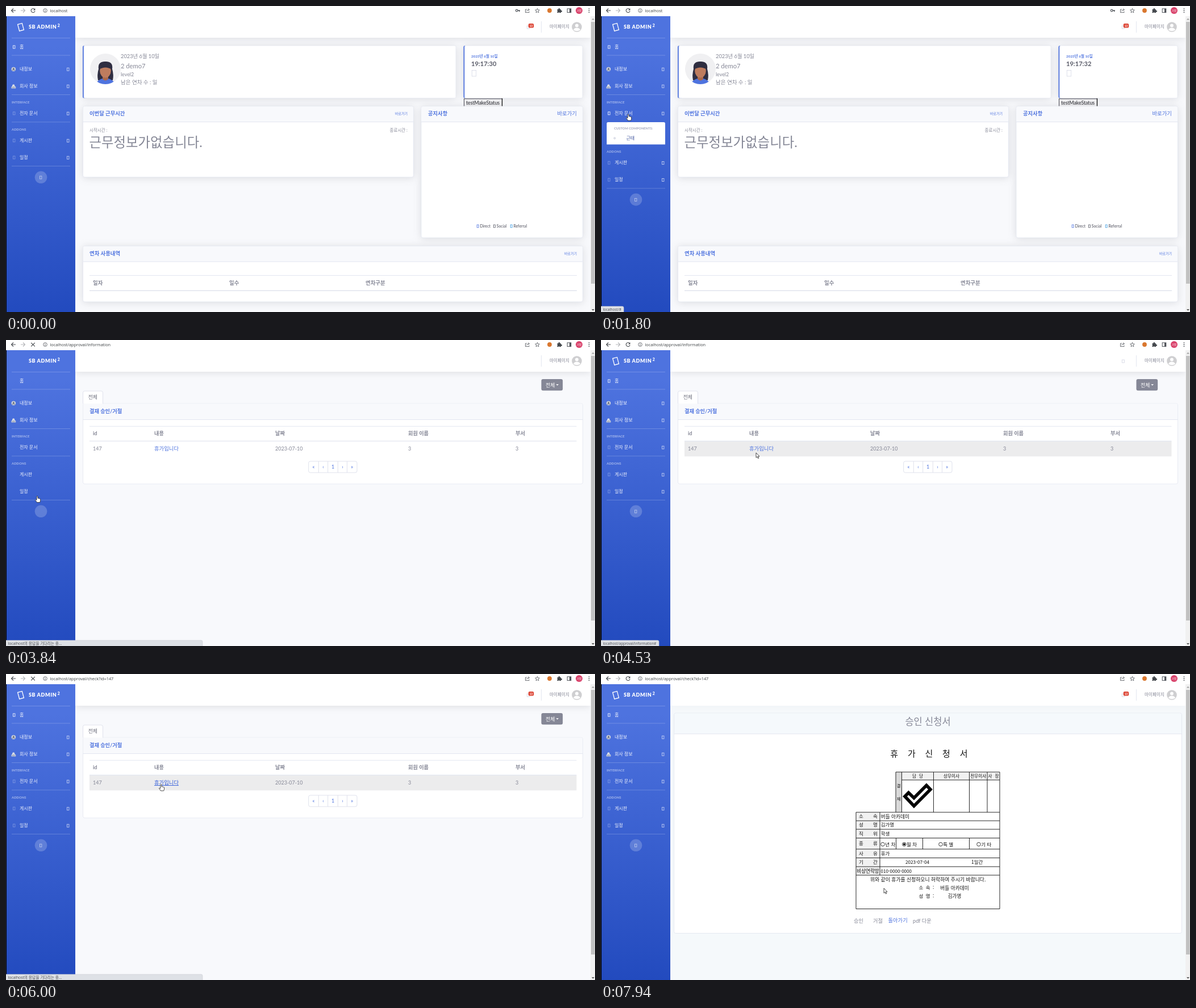
Animation of 1037x540 px, one loop 8 s. Source, as an HTML page:

```html
<!DOCTYPE html>
<html lang="ko">
<head>
<meta charset="utf-8">
<title>Admin dashboard</title>
<style>
html, body { margin: 0; width: 100%; height: 100%; overflow: hidden; background: #fff; }
svg { display: block; width: 100%; height: 100%; }
text { font-family: Lato, "Noto Sans CJK KR", "Noto Sans CJK", sans-serif; }
.ui text { font-family: "Open Sans", "Noto Sans CJK KR", "Noto Sans CJK", sans-serif; }
.form text { font-family: "Noto Sans CJK KR", "Noto Sans CJK", sans-serif; }
</style>
</head>
<body>
<script>
const LOOP = 8000;
const BLUE = '#4e73df', GRAY = '#858796', LINE = '#e3e6f0', PALE = '#f8f9fc';
const BOLD = 'font-weight="700"', HEAVY = 'font-weight="900"';
const MID = 'text-anchor="middle"', END = 'text-anchor="end"';

// Markup helpers; text is placed by its vertical centre.
const text = (x, y, s, size, fill = GRAY, extra = '') =>
  `<text x="${x}" y="${(y + size * .37).toFixed(2)}" font-size="${size}" fill="${fill}" ${extra}>${s}</text>`;
const rect = (x, y, w, h, fill, extra = '') =>
  `<rect x="${x}" y="${y}" width="${w}" height="${h}" fill="${fill}" ${extra}/>`;
const circle = (x, y, r, fill, extra = '') => `<circle cx="${x}" cy="${y}" r="${r}" fill="${fill}" ${extra}/>`;
const path = (d, stroke, width = 1, extra = '') =>
  `<path d="${d}" fill="none" stroke="${stroke}" stroke-width="${width}" ${extra}/>`;
const hline = (x1, x2, y, stroke = LINE, width = 1) => path(`M${x1} ${y}H${x2}`, stroke, width);
const group = (id, body, extra = '') => `<g id="${id}" ${extra}>${body}</g>`;
const tofu = (x, y, w, h, stroke, extra = '') => rect(x - w / 2, y - h / 2, w, h, 'none', `stroke="${stroke}" stroke-width=".8" ${extra}`);

const card = (x, y, w, h, head) =>
  rect(x, y, w, h, '#fff', `rx="3" stroke="${LINE}" stroke-width=".8"`) +
  (head ? rect(x + .4, y + .4, w - .8, head, PALE, 'rx="2.5"') + hline(x, x + w, y + head) : '');
const accentCard = (x, y, w, h) => rect(x, y, 8, h, BLUE, 'rx="2.5"') +
  rect(x + 2, y, w - 2, h, '#fff', `rx="2" stroke="${LINE}" stroke-width=".6"`);

function browser() {
  const ink = '#50545a';
  return rect(0, 0, 1037, 18, '#fff') +
    path('M17 8H9.5M13 4.5L9.5 8L13 11.5', '#45494e', 1.1) +
    path('M26 8H33.5M30 4.5L33.5 8L30 11.5', '#b4b6b9', 1.1) +
    group('reload', path('M50.3 5.7A3.5 3.5 0 1 0 51 8.9', '#45494e', 1.1) + '<path d="M51.4 4V7.4H48z" fill="#45494e"/>') +
    group('stop', path('M44.2 4.8L50.8 11.4M50.8 4.8L44.2 11.4', '#45494e', 1.1)) +
    circle(69, 8, 3.3, 'none', `stroke="${ink}" stroke-width=".8"`) + path('M69 7.5V10M69 6V6.8', ink, .9) +
    text(77.5, 8.2, '', 7.35, '#3c4043', 'id="url"') +
    group('key', circle(899.2, 8, 1.8, 'none', `stroke="${ink}" stroke-width="1.2"`) + path('M901 8H905M903.8 8V10', ink, 1.3)) +
    path('M917 6H914.5V11.5H921V9.5M916.5 9.5Q917 6.5 921 6.5M919.3 4.5L921.5 6.5L919.3 8.5', ink, .8) +
    path('M935.5 4.2L936.6 6.9L939.4 7.1L937.2 8.9L937.9 11.7L935.5 10.2L933.1 11.7L933.8 8.9L931.6 7.1L934.4 6.9Z', ink, .8) +
    circle(957, 8, 3.9, '#d9772f') +
    '<path d="M970.5 6H972.6A1.4 1.4 0 1 1 975.2 6H977V8A1.4 1.4 0 1 1 977 10.4V12H974.8A1.3 1.3 0 0 0 972.4 12H970.5V10A1.4 1.4 0 0 0 970.5 7.7Z" fill="#45494e"/>' +
    rect(988.2, 4.8, 6.6, 6.6, 'none', `stroke="${ink}"`) + rect(992, 5, 3, 6.4, ink) +
    circle(1009, 8, 6, '#d9426b') + text(1009, 8, '가명', 4.4, '#fff', MID) +
    [4.8, 8, 11.2].map(y => circle(1026.5, y, .9, ink)).join('');
}

const topbar = () =>
  rect(122, 18, 907, 38, '#fff', 'filter="url(#shadow)"') +
  tofu(919.3, 37.5, 4, 5, '#d1d3e2', 'class="glyph"') +
  group('badge', rect(919.8, 31, 9.4, 7.6, '#dc4434', 'rx="2"') + text(924.5, 34.8, '13', 4.8, '#fff', `${MID} ${BOLD}`)) +
  path('M942.5 27V47', LINE) +
  text(957, 36.3, '마이페이지', 7.6) +
  circle(1005, 37, 8.8, '#cfcfd1') + circle(1005, 34.5, 2.9, '#fff') +
  '<path d="M999 42.6Q1000 38.6 1005 38.6T1011 42.6Q1005 46 999 42.6Z" fill="#fff"/>';

const navLink = (y, label, id) =>
  (id ? tofu(14.2, y + .4, 3.4, 5, '#fff', `class="glyph" id="${id}"`) : '') +
  text(24, y, label, 8, '#fff', 'fill-opacity=".93"') +
  (label === '홈' ? '' : tofu(109.2, y + .7, 3.4, 5, '#fff', 'class="glyph" opacity=".75"'));
const navRule = y => hline(10, 113, y, 'rgba(255,255,255,.2)');
const navHead = (y, s) => text(10, y, s, 5.85, 'rgba(255,255,255,.45)', HEAVY);

const menuItems = [['근태', 233], ['비품', 253], ['결재 승인', 272.8], ['내 결재 정보', 292]];

function sidebar() {
  const items = menuItems.map(([s, y], i) =>
    rect(36, y - 9.2, 73, 18.6, '#eaecf4', `rx="2" id="hover${i}"`) +
    circle(24, y + .3, 1.5, '#eef0f6', 'stroke="#c3c7d6" stroke-width=".8"') +
    text(44.5, y, s, 8, i ? BLUE : '#3f549c', `id="item${i}"`)).join('');
  return rect(0, 18, 1, 522, '#000') + rect(1, 18, 121, 522, 'url(#side)') +
    tofu(26, 37.3, 8, 12, '#fff', 'class="glyph" transform="rotate(-15 26 37.3)" style="stroke-width:1.3"') +
    text(40, 37, 'SB ADMIN', 9, '#fff', `${HEAVY} letter-spacing=".6"`) + text(90.8, 34, '2', 6.8, '#fff', HEAVY) +
    navRule(56.5) + navLink(72, '홈', 'homeIcon') + navRule(87) +
    navLink(111, '내정보') + circle(13.3, 111.5, 3.8, '#cfd3dc') + circle(13.3, 110.4, 1.5, '#6b7487') + path('M10.8 113.6Q13.3 111.6 15.8 113.6', '#6b7487', 1.2) +
    navLink(141, '회사 정보') + '<path d="M9.5 145.5V142.5L11 141.5V139.5L13.3 138L15.3 139.5V141.5L17.2 142.5V145.5Z" fill="#d6dae4"/>' +
    path('M13.3 145.5V142M11.2 145V143M15.6 145V143', '#63718f', .8) +
    navRule(156.5) + navHead(170, 'INTERFACE') + navLink(189, '전자 문서', 'docIcon') +
    `<g clip-path="url(#fold)">${rect(10, 205, 103, 102, '#fff', 'rx="2.5"')}${text(23, 216.3, 'CUSTOM COMPONENTS:', 5.7, '#b0b3c6', HEAVY)}${items}</g>` +
    group('lower', navRule(204.8) + navHead(217.7, 'ADDONS') + navLink(237, '게시판', 'boardIcon') + navLink(267, '일정', 'planIcon') +
      navRule(282.5) + circle(61.5, 302.3, 10.8, 'rgba(255,255,255,.2)') + tofu(61.2, 302.6, 3.4, 5, '#fff', 'class="glyph" opacity=".6"'));
}

const portrait = () => circle(175, 111, 27, '#f0f0f2') +
  `<g clip-path="url(#face)">
    <path d="M162 131Q160 122 163 111Q161 98 175 98T187 111Q190 122 188 131Z" fill="#2f2e41"/>
    <ellipse cx="175" cy="142" rx="18" ry="14.5" fill="${BLUE}"/>
    <path d="M170 120H180V129Q175 134 170 129Z" fill="#a9694e"/>
    <ellipse cx="175" cy="114.5" rx="9.8" ry="12" fill="#be7c5e"/>
    <path d="M164 112Q162 99 175 98.5Q188 99 186 112Q181 108.5 175 108.5T164 112Z" fill="#2f2e41"/>
  </g>`;

const dashboard = () =>
  `<g filter="url(#shadow)">` + accentCard(135, 70, 657, 92.5) + accentCard(805.5, 70, 209.5, 92.5) + '</g>' +
  portrait() +
  text(202, 89, '2023년 6월 10일', 9.3) + text(202, 106, '2 demo7', 11.2) +
  text(202, 121, 'level2', 8.9) + text(202, 134, '남은 연차 수 : 일', 9.5) +
  text(819, 89, '2023년 6월 10일', 6.4, BLUE, BOLD) + text(819, 102.3, '', 11.1, '#5a5c69', `${BOLD} id="clock"`) +
  tofu(824, 118.7, 7.4, 10.6, '#d6d9e6') +
  rect(806.5, 163.8, 67, 16, '#efeff1', 'stroke="#4a4a55" stroke-width="1"') + path('M873.5 163V178', '#111', 1.3) +
  text(810, 171, 'testMakeStatus', 8.7, '#23242b') +
  '<g filter="url(#shadow)">' + card(135.5, 177, 582, 125, 27.6) + card(731, 177, 284.5, 232, 27.6) + card(135.5, 423.5, 880, 98.5, 27.6) + '</g>' +
  text(147, 190, '이번달 근무시간', 9.35, BLUE, BOLD) + text(707, 189.7, '바로가기', 6, BLUE, END) +
  text(147, 219, '시작시간 :', 7.5) + text(707, 219, '종료시간 :', 7.5, GRAY, END) +
  text(146.5, 240.3, '근무정보가없습니다.', 23.4) +
  text(743, 190, '공지사항', 9.3, BLUE, BOLD) + text(1005, 190, '바로가기', 9.4, BLUE, END) +
  [['Direct', 829, BLUE], ['Social', 858.3, '#5a5c69'], ['Referral', 888, '#3b9ae0']].map(([s, x, c]) =>
    tofu(x + 1.7, 388.5, 3, 4.8, c) + text(x + 5.4, 388.3, s, 6.9, '#4a4b58')).join('') +
  text(147, 436.7, '연차 사용내역', 9.4, BLUE, BOLD) + text(1005, 436.5, '바로가기', 6, BLUE, END) +
  hline(147, 1005, 475.5) + hline(147, 1005, 502.3, '#dcdfea', 1.3) +
  [['일자', 153], ['일수', 393], ['연차구분', 633]].map(([s, x]) => text(x, 488.7, s, 9.4, GRAY, BOLD)).join('');

const approvals = () =>
  rect(942.5, 69, 37.7, 20.3, GRAY, 'rx="3"') + text(950, 79.2, '전체', 9, '#fff') + '<path d="M968.5 78H973L970.75 80.6Z" fill="#fff"/>' +
  card(135.5, 112, 880, 142, 28.5) +
  `<path d="M135.5 112.5V93Q135.5 90 138.5 90H167.5Q170.5 90 170.5 93V112.5" fill="#fff" stroke="#dddfeb" stroke-width=".9"/>` +
  text(144.7, 100.7, '전체', 8.9, '#6e707e') + text(147, 126, '결재 승인/거절', 9.2, BLUE, BOLD) +
  hline(147, 1004.5, 152.3) + hline(147, 1004.5, 178.3, LINE, 1.2) + rect(147, 179, 857.5, 26.4, '#ececed', 'id="row"') +
  [['id', 153, '147'], ['내용', 261], ['날짜', 474, '2023-07-10'], ['회원 이름', 708, '3'], ['부서', 897, '3']].map(([h, x, v]) =>
    text(x, 165, h, 9.2, GRAY, BOLD) + (v ? text(x, 192, v, 9) : '')).join('') +
  text(261, 191.7, '휴가입니다', 9.35, BLUE, 'id="link"') +
  rect(532.7, 214, 85.3, 20, '#fff', 'rx="3" stroke="#dddfeb" stroke-width=".9"') +
  path('M550.3 214V234M566.7 214V234M584.3 214V234M600.5 214V234', '#dddfeb', .9) +
  [['«', 541.5], ['‹', 558.5], ['1', 575.5], ['›', 592.4], ['»', 609.2]].map(([s, x]) => text(x, 224, s, 9, BLUE, MID)).join('');

function form() {
  const ink = '#111', shade = '#f1f1f1';
  const rows = [['소', '속', 251.3], ['성', '명', 266.3], ['직', '위', 281.5], ['종', '류', 299.2], ['사', '유', 316.7], ['기', '간', 332]];
  const radios = [[496, '년 차'], [533.8, '월 차'], [598, '특 별'], [665, '기 타']];
  const t = (x, y, s, size = 8.5, extra = '') => text(x, y, s, size, ink, extra);
  return t(509.3, 140, '휴 가 신 청 서', 15, 'word-spacing="12.6"') +
    rect(519, 173, 10.5, 71, '#d9d9d9') + rect(529.5, 173, 172.5, 14, shade) + rect(449, 244, 42, 111, shade) +
    path('M519 244V173H702V414.5H449V244H702M529.5 173V244M585.5 173V244M648.5 173V244M680 173V244M529.5 187H702M491 244V355', ink, .9) +
    [259, 274, 289.5, 309, 324.5, 340, 355].map(y => hline(449, 702, y, ink, .9)).join('') +
    path('M519.5 289.5V309M566.5 289.5V309M648.5 289.5V309', ink, .9) +
    [['담 당', 557.5, 'word-spacing="3"'], ['상무이사', 617], ['전무이사', 664.3], ['사 장', 691, 'word-spacing="3"']].map(([s, x, e = '']) =>
      t(x, 180.3, s, 7.6, `${MID} ${e}`)).join('') +
    t(524.2, 197, '결', 7.4, MID) + t(524.2, 220, '재', 7.4, MID) +
    path('M535 216L541.5 209.5L551 218.7L573 196.5L580 203.7L551 233Z', '#000', 5.6) +
    rows.map(([a, b, y]) => t(458, y, a, 8.5, MID) + t(483, y, b, 8.5, MID)).join('') +
    t(470, 347.5, '비상연락망', 8.6, MID) +
    t(492.7, 251.3, '버들 아카데미', 8.7) + t(492.7, 266.3, '김가명') + t(492.7, 281.5, '학생') + t(492.7, 316.7, '휴가') +
    radios.map(([x, s], i) => circle(x, 300.5, 3.3, '#fff', `stroke="${ink}" stroke-width=".8"`) +
      (i === 1 ? circle(x, 300.5, 2, ink) : '') + t(x + 4.2, 300.5, s)).join('') +
    t(557, 332, '2023-07-04', 8.2, MID) + t(652, 332, '1일간', 8.5) + t(492.5, 347.8, '010-0000-0000', 8) +
    t(575.7, 362.5, '위와 같이 휴가를 신청하오니 허락하여 주시기 바랍니다.', 8.8, MID) +
    t(559.5, 377.3, '소 속 :', 8.5, 'word-spacing="2"') + t(622.5, 377.3, '버들 아카데미', 8.7, MID) +
    t(559.5, 392, '성 명 :', 8.5, 'word-spacing="2"') + t(622.5, 392, '김가명', 8.6, MID);
}

const request = () =>
  rect(122, 56, 907, 484, '#f5f9fc', 'opacity=".8"') +
  rect(128.5, 69, 894, 101, '#fff', `id="sheet" rx="3" stroke="${LINE}" stroke-width=".9"`) +
  rect(129, 69.5, 893, 36, '#f5f9fc', 'rx="3"') + hline(128.5, 1022.5, 105.7) +
  text(575.5, 84, '승인 신청서', 16.5, GRAY, MID) +
  group('actions', text(507, 148, '승인', 9.2) + text(541, 148, '거절', 9.2) + text(567.5, 147.5, '돌아가기', 9.3, BLUE) + text(611, 148, 'pdf 다운', 9.2)) +
  group('form', form(), 'class="form"');

const scrollbar = () => rect(1029, 18, 8, 522, '#f1f1f1') + rect(1030, 28, 6.6, 462, '#c1c1c1', 'id="thumb"') +
  '<path d="M1031 24.5H1036L1033.5 21.7Z" fill="#a0a0a0"/><path d="M1031 535H1036L1033.5 537.8Z" fill="#555"/>';

document.body.innerHTML = `<svg viewBox="0 0 1037 540" xmlns="http://www.w3.org/2000/svg">
  <defs>
    <linearGradient id="side" gradientUnits="userSpaceOnUse" x1="0" y1="18" x2="0" y2="545">
      <stop offset=".1" stop-color="${BLUE}"/><stop offset="1" stop-color="#224abe"/>
    </linearGradient>
    <filter id="shadow" filterUnits="userSpaceOnUse" x="100" y="0" width="937" height="540" color-interpolation-filters="sRGB">
      <feDropShadow dx="0" dy="1.3" stdDeviation="7" flood-color="#3a3b45" flood-opacity=".15"/>
    </filter>
    <clipPath id="fold"><rect id="foldBox" x="0" y="205" width="122" height="0"/></clipPath>
    <clipPath id="face"><circle cx="175" cy="111" r="27"/></clipPath>
  </defs>
  ${rect(0, 0, 1037, 540, PALE)}
  <g id="topA">${topbar()}</g>
  ${group('dash', dashboard())}${group('list', approvals())}${group('check', request())}
  ${sidebar()}${scrollbar()}
  <g class="ui">${browser()}
    ${group('status', rect(-3, 530, 10, 13, '#dee1e6', 'id="statusBox" rx="2.5" stroke="#c9ccd2" stroke-width=".6"') + text(3.5, 535.6, '', 6.2, '#4a4d52', 'id="statusText"'))}
  </g>
  <g id="cursor">
    <path id="arrow" d="M0 0V8.6L2 6.8L3.4 10L4.8 9.4L3.4 6.3H6Z" fill="#fff" stroke="#222" stroke-width=".8"/>
    <path id="hand" d="M-1 1Q0 -.6 1 1V4.4Q2.2 3.6 2.9 4.8Q4.1 4.2 4.5 5.3Q5.6 5 5.6 6.5V8.5Q5.4 10 4.6 11.6H-.6Q-1.6 9.6 -3.6 7.4Q-3.4 5.8 -1 7.4Z" fill="#fff" stroke="#222" stroke-width=".8"/>
  </g>
</svg>`;

const $ = id => document.getElementById(id);
const show = (id, on) => $(id).style.display = on ? '' : 'none';
const attr = (id, name, value) => $(id).setAttribute(name, value);
const glyphs = document.querySelectorAll('.glyph');

// Cursor stops: time, x, y
const stops = [[110, 420, 474], [310, 320, 296], [510, 320, 296], [1280, 47, 191], [1400, 48, 190.5], [2050, 48, 190.5],
  [2360, 54, 274], [2430, 55, 275], [4210, 55, 275], [4530, 273, 199], [5000, 273, 196.5], [5070, 273, 194.5],
  [7000, 273, 194.5], [7130, 400, 256], [7740, 498, 376], [7940, 498, 378]];
function cursorAt(t) {
  const i = stops.findIndex(s => s[0] > t);
  if (i < 0) return stops[stops.length - 1].slice(1);
  if (i === 0) return stops[0].slice(1);
  const [t0, x0, y0] = stops[i - 1], [t1, x1, y1] = stops[i];
  const p = (t - t0) / (t1 - t0), k = p * p * (3 - 2 * p);
  return [x0 + (x1 - x0) * k, y0 + (y1 - y0) * k];
}

// CSS "ease" timing curve
function ease(p) {
  if (p <= 0 || p >= 1) return Math.min(1, Math.max(0, p));
  let lo = 0, hi = 1;
  const bez = (u, a, b) => 3 * u * (1 - u) ** 2 * a + 3 * u * u * (1 - u) * b + u ** 3;
  for (let i = 0; i < 20; i++) {
    const u = (lo + hi) / 2;
    bez(u, .25, .25) < p ? lo = u : hi = u;
  }
  return bez(lo, .1, 1);
}

// Status bubble: start time, text, width, font size
const WAIT = ['localhost의 응답을 기다리는 중...', 346, 6.75];
const statuses = [[0], [1600, 'localhost/#', 40, 6.2], [2220, 'localhost/approval/information', 99, 6.2], [2690, ...WAIT],
  [4210, 'localhost/approval/information#', 102, 6.2], [4850], [5730, ...WAIT], [7330]];
const lastBefore = (list, t) => list.filter(e => e[0] <= t).pop();

function draw(t) {
  const onDash = t < 3770, onCheck = t >= 6600, onList = !onDash && !onCheck;
  const bare = (t >= 3770 && t < 4210) || (t >= 6600 && t < 7260);
  const loading = (t >= 2690 && t < 4210) || (t >= 5730 && t < 7330);
  const [x, y] = cursorAt(t);

  show('dash', onDash); show('list', onList); show('check', onCheck);
  glyphs.forEach(g => g.style.display = bare ? 'none' : '');
  show('badge', onDash || (t >= 5070 && t < 6600) || t >= 7810);
  show('reload', !loading); show('stop', loading); show('key', t < 3030);
  $('url').textContent = 'localhost' + (t >= 6000 ? '/approval/check?id=147' : t >= 3030 ? '/approval/information' : '');
  attr('thumb', 'height', onDash ? 462 : 467);
  $('clock').textContent = '19:17:' + (30 + Math.min(3, Math.max(0, Math.floor((t + 790) / 1000))));

  const fold = onDash ? 111 * ease((t - 1722) / 350) : 0;
  attr('foldBox', 'height', fold);
  attr('lower', 'transform', `translate(0 ${fold})`);

  let pointing = t >= 5070 && t < 6800;
  const inSide = t >= 510 && x < 122;
  [['docIcon', 189], ['boardIcon', 237 + fold], ['planIcon', 267 + fold]].forEach(([id, cy]) => {
    const over = inSide && Math.abs(y - cy) < 15;
    attr(id, 'opacity', over ? 1 : .35);
    pointing = pointing || over;
  });
  menuItems.forEach(([, cy], i) => {
    const over = inSide && fold > 110 && Math.abs(y - cy) < 9.7;
    show('hover' + i, over);
    attr('item' + i, 'text-decoration', over ? 'underline' : 'none');
    attr('item' + i, 'fill', over ? '#2e4fb5' : i ? BLUE : '#3f549c');
    pointing = pointing || over;
  });

  show('row', onList && x > 147 && y > 179 && y < 205.5);
  attr('link', 'text-decoration', t >= 5070 ? 'underline' : 'none');
  attr('link', 'fill', t >= 5070 ? '#2e59d9' : BLUE);

  const filled = t >= 7260;
  show('form', filled);
  attr('sheet', 'height', filled ? 388.5 : 101);
  attr('actions', 'transform', filled ? 'translate(-62 287.5)' : '');

  const [, label, width, size] = lastBefore(statuses, t);
  show('status', !!label);
  if (label) {
    $('statusText').textContent = label;
    attr('statusText', 'font-size', size);
    attr('statusBox', 'width', width + 3);
  }

  show('cursor', t >= 110);
  attr('cursor', 'transform', `translate(${x.toFixed(2)} ${y.toFixed(2)})`);
  show('hand', pointing); show('arrow', !pointing);
}

const start = performance.now();
function tick() {
  draw((performance.now() - start) % LOOP);
  requestAnimationFrame(tick);
}
tick();
</script>
</body>
</html>
```
